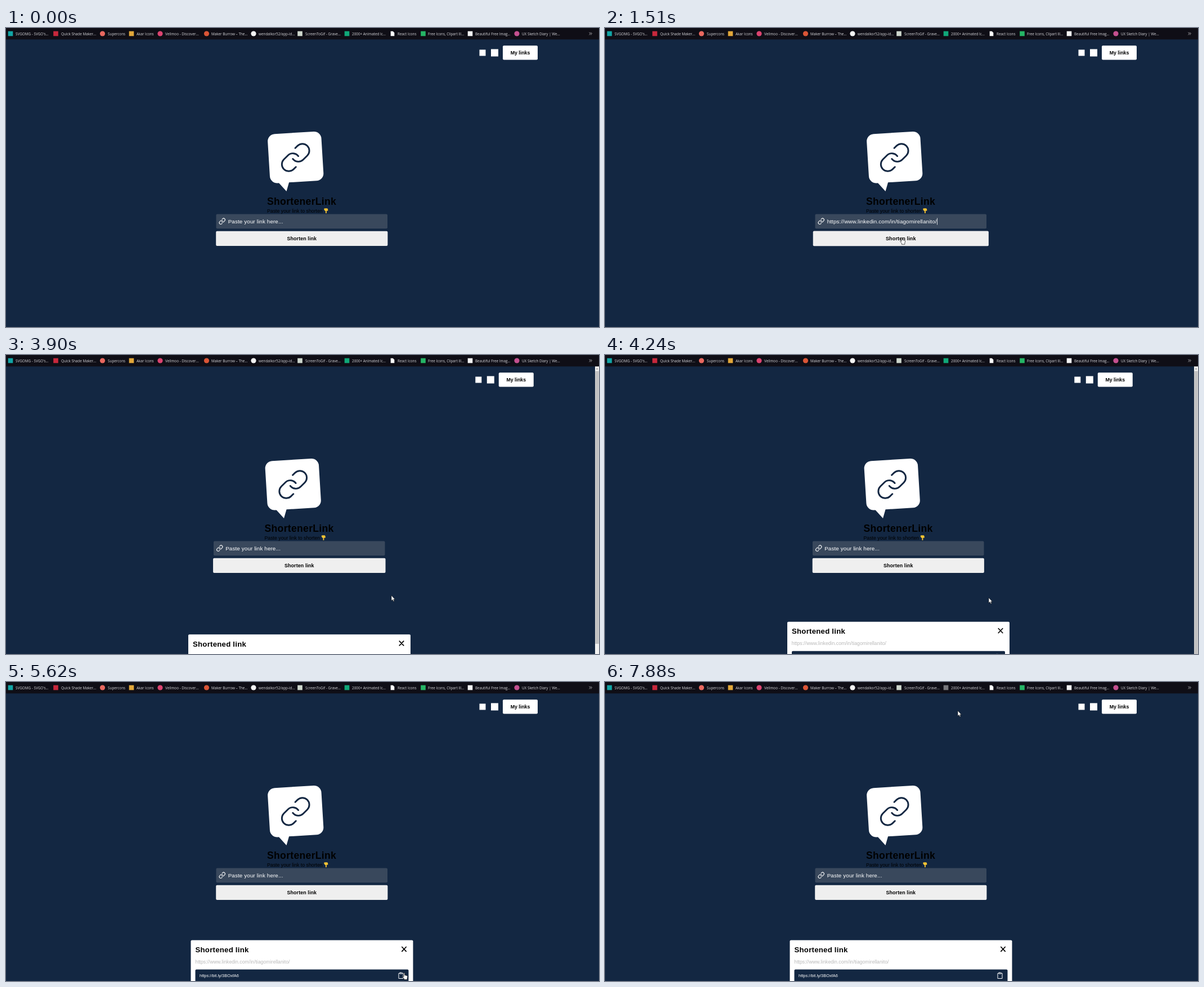
These frames come from a looping animation (1054 by 531 pixels, 8 s). An HTML page:

```html
<!DOCTYPE html>
<html lang="en">
<head>
<meta charset="utf-8">
<title>Link shortener demo</title>
<style>
  html, body { margin: 0; width: 100%; height: 100%; overflow: hidden; background: #132742; }
  svg { display: block; position: absolute; left: 0; top: 0; }
  text { font-family: "Liberation Sans", Arial, sans-serif; white-space: pre; }
  .bar text { font: 6.35px "Open Sans", "Noto Sans", sans-serif; fill: #d6d6da; }
  .bold { font-weight: 700; }
  .field { font-size: 9.9px; letter-spacing: .1px; fill: #fff; }
  .line { fill: none; stroke-linecap: round; stroke-linejoin: round; }
</style>
</head>
<body>
<svg width="1054" height="531" viewBox="0 0 1054 531">
  <defs>
    <g id="chain" class="line">
      <path d="M10 13a5 5 0 0 0 7.54.54l3-3a5 5 0 0 0-7.07-7.07l-1.72 1.71"/>
      <path d="M14 11a5 5 0 0 0-7.54-.54l-3 3a5 5 0 0 0 7.07 7.07l1.71-1.71"/>
    </g>
  </defs>
  <rect width="1054" height="531" fill="#132742"/>

  <g id="nav">
    <rect x="841.5" y="38.5" width="11" height="11" fill="#fff"/>
    <rect x="862" y="37.5" width="13" height="13" fill="#fff"/>
    <rect x="883" y="31.3" width="62" height="25.2" rx="2" fill="#fff"/>
    <text class="bold" x="914" y="47" font-size="8.8" text-anchor="middle">My links</text>
  </g>

  <g id="main">
    <g fill="#fff">
      <rect x="467" y="186" width="95.5" height="87.5" rx="13" transform="rotate(-3.5 514.7 229.8)"/>
      <path d="M483 273L498.5 290L504 271Z"/>
    </g>
    <use href="#chain" transform="translate(485.3 200.6) scale(2.45)" stroke="#132742" stroke-width="1.2"/>
    <text class="bold" x="464" y="314" font-size="17.6" letter-spacing=".3">ShortenerLink</text>
    <text x="464" y="328" font-size="8.75">Paste your link to shorten</text>
    <path d="M565 321.2L566.5 320.3H571L572.2 321.8V324.8H569.8V329H568V325.2L566.3 324.2Z" fill="#f6c433"/>
    <rect x="373.5" y="330.5" width="304.5" height="25.8" rx="2" fill="#39485c"/>
    <use href="#chain" transform="translate(378 337) scale(.52)" stroke="#fff" stroke-width="2"/>
    <text class="field" id="entry" x="394.7" y="347"></text>
    <rect id="caret" y="337.5" width=".8" height="12" fill="#fff"/>
    <g id="button">
      <rect x="373.2" y="360.7" width="305.2" height="26.2" rx="2" fill="#efefef"/>
      <text class="bold" x="525.8" y="376.8" font-size="8.9" letter-spacing=".1" text-anchor="middle">Shorten link</text>
    </g>
  </g>

  <g id="modal">
    <rect x="328.5" width="395" height="110" rx="2" fill="#fff"/>
    <text class="bold" x="336.5" y="21.6" font-size="13.2" letter-spacing=".25">Shortened link</text>
    <path class="line" d="M703.8 12L711.2 19.8M711.2 12L703.8 19.8" stroke="#000" stroke-width="1.7"/>
    <text id="longLink" x="336.3" y="41.7" font-size="8.73" fill="#b9b9b9"></text>
    <rect x="336.5" y="52" width="379" height="40" rx="2" fill="#132742"/>
    <text x="344" y="65.3" font-size="7.4" letter-spacing=".04" fill="#fff">https://bit.ly/3BOxfA6</text>
    <g class="line" stroke="#fff" stroke-width="1">
      <path d="M700 58.8H698V68H706V58.8H704"/>
      <rect x="700" y="57.7" width="4" height="2" rx=".5"/>
    </g>
  </g>

  <g id="scroll">
    <rect x="1047" y="20" width="7" height="511" fill="#f1f1f1"/>
    <path d="M1048.7 25.5L1050.5 23.3L1052.3 25.5Z" fill="#8a8a8a"/>
    <rect id="thumb" x="1047.3" y="28.5" width="6.4" fill="#c1c1c1"/>
  </g>

  <g class="bar" id="bar"><rect width="1054" height="20.3" fill="#0f0e16"/></g>

  <g id="pointer">
    <path id="arrow" d="M0 0V9.3L2.2 7.4L3.7 10.8L5.2 10.1L3.8 6.9H6.4Z" fill="#fff" stroke="#111" stroke-width=".6"/>
    <path id="hand" d="M-.9 .9Q0-.6 .9 .9V4.2L5 5.2Q6 5.6 5.8 7L5 10.2V12.2H-.4V10.6L-2.9 7.3Q-3.3 6.1-2.2 6L-.9 7.2Z" fill="#fff" stroke="#111" stroke-width=".7"/>
    <path id="beam" d="M-1.8-5H1.8M0-5V5M-1.8 5H1.8" fill="none" stroke="#e8e8e8" stroke-width=".8"/>
  </g>
</svg>
<script>
const LOOP = 8000;
const URL_TEXT = 'https://www.linkedin.com/in/tiagomirellanito/';
const $ = id => document.getElementById(id);
const show = (el, on) => el.setAttribute('visibility', on ? 'visible' : 'hidden');
const move = (el, x, y) => el.setAttribute('transform', `translate(${x} ${y})`);

// Bookmarks: label x, icon centre, shape, colour, label
const marks = [
  [17, 8, 'sq', '#12a5a5', "SVGOMG - SVGO's..."],
  [98, 88.5, 'sq', '#c8283c', 'Quick Shade Maker...'],
  [181, 171.5, 'dot', '#e8685f', 'Supercons'],
  [232, 223, 'sq', '#e2a73a', 'Akar Icons'],
  [283, 274, 'dot', '#dc4470', 'Vellmoo - Discover...'],
  [365, 356.5, 'dot', '#da5536', 'Maker Burrow – The...'],
  [449, 440, 'dot', '#f4f4f4', 'wendalkor52/app-id...'],
  [532, 522.5, 'sq', '#cdd6cc', 'ScreenToGif - Grave...'],
  [615, 606, 'sq', '#10a878', '2000+ Animated Ic...'],
  [696, 687, 'page', '#fff', 'React Icons'],
  [750, 741.5, 'sq', '#25b565', 'Free Icons, Clipart Ill...'],
  [834, 825, 'sq', '#f4f4f4', 'Beautiful Free Imag...'],
  [917, 908, 'dot', '#c4508f', 'UX Sketch Diary | We...']
];
const shapes = {
  sq: (x, c) => `<rect x="${x - 4.3}" y="5.7" width="8.6" height="8.6" fill="${c}"/>`,
  dot: (x, c) => `<circle cx="${x}" cy="10" r="4.6" fill="${c}"/>`,
  page: (x, c) => `<path d="M${x - 3.3} 5.8h4l2.6 2.6v5.9h-6.6z" fill="${c}"/>`
};
$('bar').innerHTML += marks.map(([tx, ix, shape, color, label]) =>
  `<g>${shapes[shape](ix, color)}<text x="${tx}" y="12.5">${label}</text></g>`).join('') +
  '<path class="line" d="M1036.8 8l2 2-2 2M1039.4 8l2 2-2 2" stroke="#d6d6da" stroke-width=".8"/>';
const fadingIcon = $('bar').querySelectorAll('g')[8].firstChild;

$('longLink').textContent = URL_TEXT;

// Pointer tip: time, x, y
const path = [
  [130, 971, 525], [400, 770, 430], [620, 610, 372], [850, 530, 343],
  [1120, 530, 343], [1300, 529, 366], [1510, 527.8, 372], [1910, 525, 367.5],
  [3230, 525, 367.5], [3290, 530, 377], [3600, 645, 414],
  [3900, 685, 427], [4110, 682, 431], [4570, 682, 431], [4900, 686, 440],
  [5130, 722, 500], [5360, 708, 517], [5620, 708, 517], [6000, 700, 290],
  [6350, 674, 82], [6420, 672, 78], [6600, 612, 46], [6740, 645, 58],
  [7690, 645, 58], [7880, 627, 51], [8000, 627, 51]
];

function pointAt(t) {
  const i = Math.max(1, path.findIndex(p => p[0] > t));
  const [t0, x0, y0] = path[i - 1], [t1, x1, y1] = path[i];
  const k = Math.max(0, (t - t0) / (t1 - t0));
  return [x0 + (x1 - x0) * k, y0 + (y1 - y0) * k];
}

// CSS "ease": cubic-bezier(.25, .1, .25, 1)
function ease(p) {
  if (p <= 0) return 0;
  if (p >= 1) return 1;
  const bez = (s, a, b) => 3 * a * s * (1 - s) ** 2 + 3 * b * s * s * (1 - s) + s ** 3;
  let lo = 0, hi = 1;
  for (let i = 0; i < 20; i++) {
    const mid = (lo + hi) / 2;
    if (bez(mid, .25, .25) < p) lo = mid; else hi = mid;
  }
  return bez(lo, .1, 1);
}

const OPEN = 3410;
const within = (v, a, b) => v >= a && v < b;

function pointerKind(x, y, t) {
  const overColumn = within(x, 374, 678);
  if (overColumn && within(y, 331, 356.5) && t < 6000) return 'beam';
  if (overColumn && within(y, 361, 387) && t < 6000) return 'hand';
  if (within(t, 5250, 5680)) return 'hand';
  return 'arrow';
}

function draw(t) {
  const top = 458.5 + 75 * (1 - ease((t - OPEN) / 1680));
  const open = t >= OPEN;
  const scrolling = open && top > 470;
  const shift = scrolling ? -4.5 : 0;

  move($('nav'), scrolling ? -7.2 : 0, 0);
  move($('main'), shift, 0);
  move($('modal'), shift, top);
  show($('modal'), open);
  show($('scroll'), scrolling);
  $('thumb').setAttribute('height', Math.max(0, 485.5 + (495 - top) * .93));

  const typed = within(t, 1120, OPEN);
  $('entry').textContent = typed ? URL_TEXT : 'Paste your link here...';
  $('caret').setAttribute('x', typed ? 395.2 + $('entry').getComputedTextLength() : 395);
  show($('caret'), within(t, 800, 1590) || within(t, 2120, 2700));

  const hover = ease((t - 1267) / 900) - ease((t - 3320) / 900);
  $('button').setAttribute('transform',
    `translate(525.8 373.8) scale(${1 + .05 * hover}) translate(-525.8 -373.8)`);

  const [x, y] = pointAt(t);
  const kind = pointerKind(x, y, t);
  move($('pointer'), x, y);
  for (const k of ['arrow', 'hand', 'beam']) show($(k), t >= 130 && k === kind);

  fadingIcon.setAttribute('fill', t >= 7750 ? '#77777b' : '#10a878');
}

const start = performance.now();
function tick() {
  draw((performance.now() - start) % LOOP);
  requestAnimationFrame(tick);
}
tick();
</script>
</body>
</html>
```
